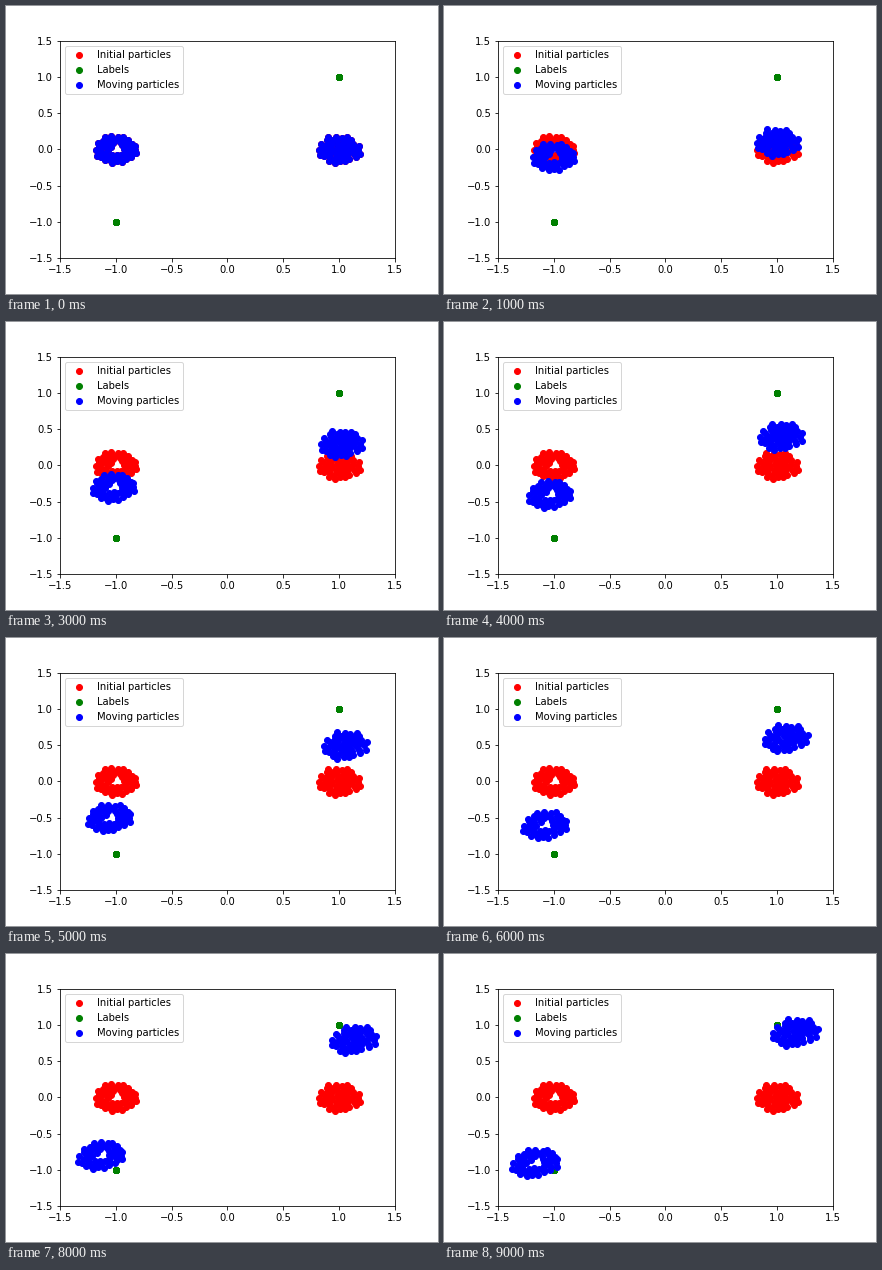
Recreate the animation shown at these times as a matplotlib script. Size 432x288 px, loop 10000 ms.

```python
import numpy as np
import matplotlib.pyplot as plt
from matplotlib.animation import FuncAnimation

FRAMES = 10
STEP_MS = 1000
COUNT = 50        # particles per cluster
RADIUS = 0.195
JITTER = 0.01
DRIFT = 0.46      # strength of the sideways drift
SHEAR = 0.7       # how far the starting height changes that drift
GOLDEN = np.pi * (3 - np.sqrt(5))

rng = np.random.default_rng(4)


def cluster(center_x, hole):
    """Sunflower spiral with a little noise, open in the middle up to `hole`."""
    i = np.arange(COUNT)
    r = np.sqrt(hole**2 + (RADIUS**2 - hole**2) * (i + 0.5) / COUNT)
    angle = GOLDEN * i
    spiral = np.column_stack([r * np.cos(angle), r * np.sin(angle)])
    return spiral + rng.uniform(-JITTER, JITTER, spiral.shape) + (center_x, 0)


def log_cosh(v):
    return np.log(np.cosh(v))


start = np.vstack([cluster(-1, hole=0.06), cluster(1, hole=0)])
side = np.sign(start[:, 0])


def positions(t):
    """Constant climb, with a sideways speed that follows tanh of the height."""
    x, y = start.T
    low = SHEAR * y
    drift = log_cosh(low + side * t) - log_cosh(low)
    new_x = x + side * DRIFT * np.sqrt(np.abs(x)) * drift
    return np.column_stack([new_x, y + side * t])


fig, ax = plt.subplots(figsize=(6, 4), dpi=72)
fig.subplots_adjust(left=0.125, right=0.9, bottom=0.125, top=0.88)
ax.set_xlim(-1.5, 1.5)
ax.set_ylim(-1.5, 1.5)

ax.scatter(*start.T, color="red", label="Initial particles")
ax.scatter(side, side, color="green", label="Labels")
moving = ax.scatter(*start.T, color="blue", label="Moving particles")
ax.legend(loc="upper left")


def update(i):
    moving.set_offsets(positions(i / FRAMES))
    return (moving,)


anim = FuncAnimation(fig, update, frames=FRAMES, interval=STEP_MS,
                     repeat=True, repeat_delay=0)
plt.show()
```
